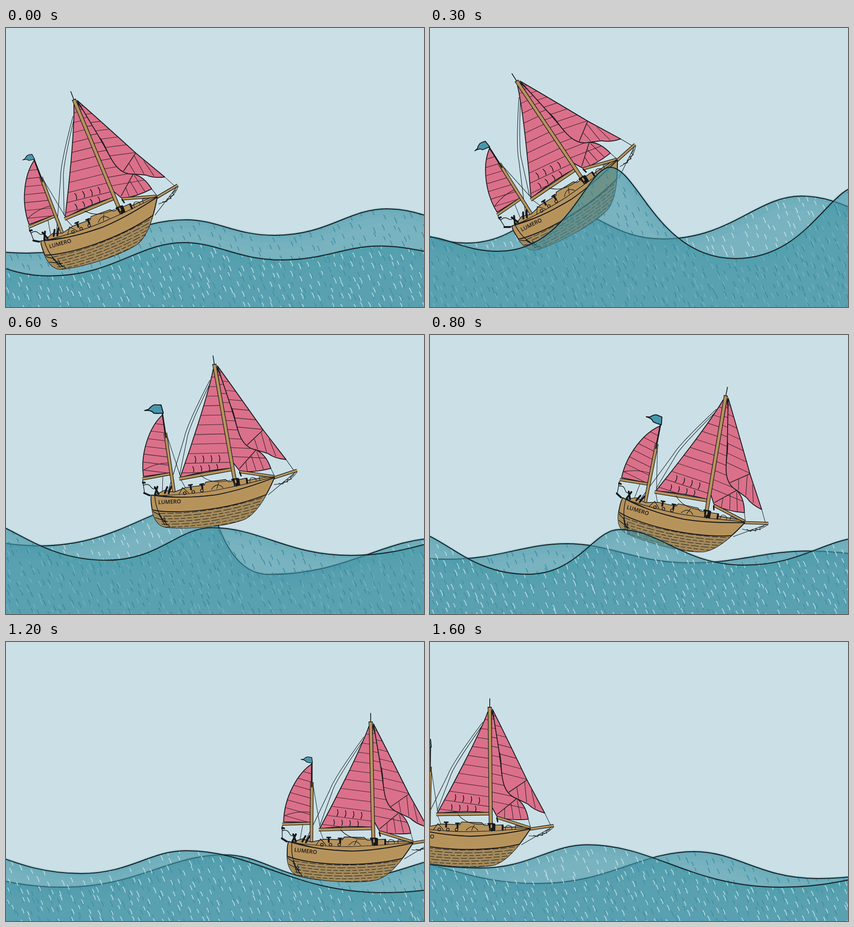
These frames come from a looping animation (917x611 px, 1700 ms). An HTML page with a canvas:

```html
<!DOCTYPE html>
<html lang="en">
<head>
<meta charset="utf-8">
<title>Sailing boat</title>
<style>
html, body { margin: 0; width: 100%; height: 100%; overflow: hidden; background: #cae0e6; }
canvas { display: block; }
</style>
</head>
<body>
<canvas id="stage" width="917" height="611"></canvas>
<script>
const W = 917, H = 611, STEP = 100, STEPS = 17;
const WRAP = W + 360, MARGIN = 200;
const ctx = document.getElementById('stage').getContext('2d');
const INK = '#14171a', WOOD = '#b7935c', PINK = '#db708a', WATER = 'rgba(66,147,166,';

// boat: masthead x, y and heel in degrees; waves: four neighbouring crests and troughs
const poses = [
  { step: 0, boat: [149, 157, -21.3],
    back: [[45, 493], [395, 420], [590, 454], [835, 396]],
    front: [[-130, 490], [95, 543], [390, 470], [605, 508]] },
  { step: 3, boat: [190, 116, -32.6],
    back: [[80, 471], [290, 395], [510, 462], [815, 368]],
    front: [[-20, 456], [150, 489], [395, 305], [670, 505]] },
  { step: 5, boat: [361, 30, -18.5],
    back: [[90, 447], [515, 320], [580, 537], [1020, 430]],
    front: [[-130, 375], [225, 478], [470, 420], [790, 472]] },
  { step: 8, boat: [649, 133, 10.8],
    back: [[40, 491], [300, 457], [570, 499], [830, 473]],
    front: [[-60, 425], [215, 524], [415, 426], [690, 504]] },
  { step: 12, boat: [800, 175, 0],
    back: [[125, 537], [480, 466], [720, 522], [1020, 465]],
    front: [[-150, 440], [165, 507], [395, 457], [830, 549]] },
  { step: 14, boat: [881, 121, -25.7],
    back: [[135, 525], [470, 456], [750, 514], [950, 480]],
    front: [[5, 379], [285, 544], [720, 410], [1000, 502]] },
  { step: 16, boat: [131 + WRAP, 143, .8],
    back: [[235, 529], [580, 459], [850, 518], [1000, 510]],
    front: [[-100, 480], [110, 495], [345, 444], [770, 537]] }
];

const mix = (a, b, k) => Array.isArray(a) ? a.map((v, i) => mix(v, b[i], k)) : a + (b - a) * k;

function poseAt(step) {
  const n = Math.max(1, poses.findIndex(pose => pose.step >= step));
  const a = poses[n - 1], b = poses[n], k = (step - a.step) / (b.step - a.step);
  return {
    boat: mix(a.boat, b.boat, k),
    back: mix(a.back, b.back, k),
    front: mix(a.front, b.front, k)
  };
}

function seeded(seed) {
  return () => (seed = (seed * 16807) % 2147483647) / 2147483647;
}

function line(d, width = 1.2, color = INK) {
  ctx.lineWidth = width;
  ctx.strokeStyle = color;
  ctx.stroke(new Path2D(d));
}

function shape(d, fill, width = 1.6) {
  ctx.fillStyle = fill;
  ctx.fill(new Path2D(d));
  line(d, width);
}

function spar(d, width) {
  ctx.lineCap = 'butt';
  line(d, width + 2.6);
  line(d, width, WOOD);
  ctx.lineCap = 'round';
}

function inside(path, draw) {
  ctx.save();
  ctx.clip(path);
  draw();
  ctx.restore();
}

function sail(d, top, bottom, gap, slope) {
  ctx.fillStyle = PINK;
  ctx.fill(new Path2D(d));
  inside(new Path2D(d), () => {
    for (let y = top; y < bottom; y += gap)
      line(`M-200 ${y - 200 * slope}L130 ${y + 130 * slope}`, 1.1, '#33242c');
  });
  line(d, 1.8);
}

function drawRigging() {
  line('M-15 33Q-80 122-90 150L-145 265M-13 36Q-78 130-84 152L-112 228', 1.1);
  line('M-132 135L-155 258M-126 140L-111 230M-111 238L-102 262', 1);
  line('M124 230L138 258M88 244L94 264', 1);
  line('M144 258L74 300M144 260Q122 284 90 280', 1.1);
  line('M136 265l-9 5 2 4-10 0 1 5-9-2-2 5-9-3', 1.2);
}

function drawMizzen(flagSize) {
  sail('M-129 92C-160 112-190 165-191 219L-132 220Z', 150, 272, 18, .28);
  line('M-188 205Q-160 194-133 198', 1.1);
  spar('M-194 224L-131 222', 4);
  spar('M-129 132L-130 262', 5);
  line('M-129 88L-129 142', 3);
  ctx.save();
  ctx.translate(-129, 92);
  ctx.scale(flagSize, flagSize);
  shape('M-34-14L-26-15Q-16-24-10-22L0-20 2-3Q-10-4-17-6-20-13-34-14Z', '#4a96ac', 2);
  ctx.restore();
}

function drawMainSails() {
  sail('M-4 10C-24 66-84 182-112 234Q-50 226 6 231L3 10Z', 28, 245, 21, .13);
  for (let i = 0; i < 4; i++) {
    const x = -73 + i * 17.5;
    line(`M${x} ${192 + i * 2}q3 7-1 14M${x - 8} ${214 + i}q3 6 0 12`, 1.6);
  }
  sail('M4 6L17 52 22 97 29 147Q38 186 62 199 82 212 88 244 50 248 20 240L6 215Z', 24, 206, 20, .2);
  sail('M6 4C30 50 64 118 84 158L124 230Q100 224 87 211L62 199C18 184 32 120 22 97Z', 16, 145, 20, .25);
  line('M20 234L62 199M45 185L84 158', 1.5);
  line('M36 222L36 242M50 211L55 243M63 203L72 243M62 175L66 198M79 163L84 207M94 180L103 219', 1);
}

function drawHull() {
  const hull = 'M-179 262Q-184 264-183 300-180 329-160 336-120 347-55 350-10 351 15 345 50 334 93 265 20 281-40 283-120 281-179 262Z';
  shape('M-172 263L-150 256-130 263-102 257-62 258-58 252-14 253-8 259 30 257 34 262 78 261 93 265 20 281-40 283-110 279Z', WOOD, 1.4);
  line('M-160 266Q-90 274-40 273L20 270 88 264', 1.2);
  line('M-120 270l10-14 12 14M-48 270q14-16 26 0M-36 270l6-12M-66 236q20 24 62 20M38 268q0-12 8-10t6 8M60 266v-8l10 1', 1.2);
  line('M-92 254v9M-67 256v9M8 252v18M14 256v13M32 258v10', 4);
  line('M-96 253h8M-71 255h8M0 256h13', 3);
  for (let x = -110; x < -70; x += 19) line(`M${x} 269a3 3 0 1 0 6 0a3 3 0 1 0-6 0`, 1.4);
  shape(hull, WOOD, 2);
  inside(new Path2D(hull), () => {
    const waterline = 'M-186 293C-140 312-20 322 78 297';
    ctx.fillStyle = '#a3895a';
    ctx.fill(new Path2D(waterline + 'L110 400-200 400Z'));
    line(waterline, 2);
    for (let i = 1; i < 8; i++) {
      ctx.setLineDash([9 + i % 3 * 4, 5]);
      ctx.lineDashOffset = i * 17;
      line(`M-170 ${298 + i * 6}Q-50 ${319 + i * 6} 90 ${294 + i * 6}`, 1);
    }
    ctx.setLineDash([]);
  });
  line('M-173 265C-175 292-168 318-150 337M-182 298l14 10M-179 312l25 13M-170 305l9 26M-160 314l3 18', 1.4);
  ctx.save();
  ctx.translate(-168, 284);
  ctx.rotate(.11);
  ctx.fillStyle = INK;
  ctx.font = '600 12px "Open Sans", sans-serif';
  ctx.fillText('LUMERO', 0, 0);
  ctx.restore();
}

function drawBoat([x, y, heel], flagSize) {
  ctx.save();
  ctx.translate((x + MARGIN) % WRAP - MARGIN, y);
  ctx.rotate(heel * Math.PI / 180);
  drawRigging();
  drawMizzen(flagSize);
  drawMainSails();
  spar('M-114 236L6 233', 5);
  spar('M20 241L93 263', 4);
  spar('M88 266L144 257', 4);
  drawHull();
  spar('M0 0L6 264', 6);
  line('M-4 0H4M0 0V-19', 1.7);
  line('M0 255h12M4 255v14M11 255v14M19 242l2 8', 3);
  // stern gear
  line('M-193 226q-4 8 0 12 10-3 14 5t8 6M-194 232v22q2 6 14 8', 1.4);
  line('M-194 232l4 1M-195 255l11 7M-170 246l6 16M-164 246l-8 16M-150 262l7-12M-142 264l8-14', 4);
  ctx.restore();
}

function drawMarks(light, random) {
  const gap = 22;
  for (let y = 290; y < H; y += gap)
    for (let x = -gap; x < W; x += gap) {
      const px = x + random() * 16, py = y + random() * 16, size = 7 + random() * 5;
      line(`M${px} ${py}q${size * .35} ${size * .4} ${size * .45} ${size}`, 1.8,
        light ? 'rgba(205,233,238,.8)' : 'rgba(45,132,156,.75)');
    }
}

// The swell repeats beyond its outer points, a little flatter each time
const continued = (near, next) => [2 * near[0] - next[0], near[1] + .8 * (next[1] - near[1])];

function crestLine(points) {
  const pts = [continued(points[0], points[1]), ...points];
  for (let i = 0; i < 2; i++) pts.push(continued(pts.at(-1), pts.at(-2)));
  let d = `M${pts[0]}`;
  for (let i = 1; i < pts.length; i++) {
    const [x0, y0] = pts[i - 1], [x1, y1] = pts[i];
    // steep waves get narrow crests and wide troughs, until they topple over
    const reach = .4 * (x1 - x0), drop = Math.abs(y1 - y0);
    const crest = Math.abs(reach - .25 * drop), trough = reach + .3 * drop;
    const [out, into] = y0 < y1 ? [crest, trough] : [trough, crest];
    d += `C${x0 + out} ${y0} ${x1 - into} ${y1} ${x1} ${y1}`;
  }
  return { d, left: pts[0][0], right: pts.at(-1)[0] };
}

function drawWave(points, light, seed) {
  const { d, left, right } = crestLine(points);
  const body = new Path2D(`${d}L${right} 700H${left}Z`);
  ctx.fillStyle = WATER + '.58)';
  ctx.fill(body);
  inside(body, () => {
    for (const width of [14, 34, 60]) line(d, width, WATER + '.08)');
    drawMarks(light, seeded(seed));
  });
  line(d, 6, WATER + '.25)');
  line(d, 2);
}

function drawScene(step) {
  ctx.fillStyle = '#cae0e6';
  ctx.fillRect(0, 0, W, H);
  ctx.lineCap = ctx.lineJoin = 'round';
  const pose = poseAt(step);
  const darkFront = step >= 2 && step <= 6;
  const flagSize = .9 - .2 * Math.cos(step * Math.PI / 6);
  drawWave(pose.back, darkFront, 911 + step * 37);
  drawBoat(pose.boat, flagSize);
  drawWave(pose.front, !darkFront, 4177 + step * 53);
}

let shown = -1;
function tick() {
  const step = Math.floor(performance.now() / STEP) % STEPS;
  if (step !== shown) drawScene(shown = step);
  requestAnimationFrame(tick);
}
tick();
</script>
</body>
</html>
```
